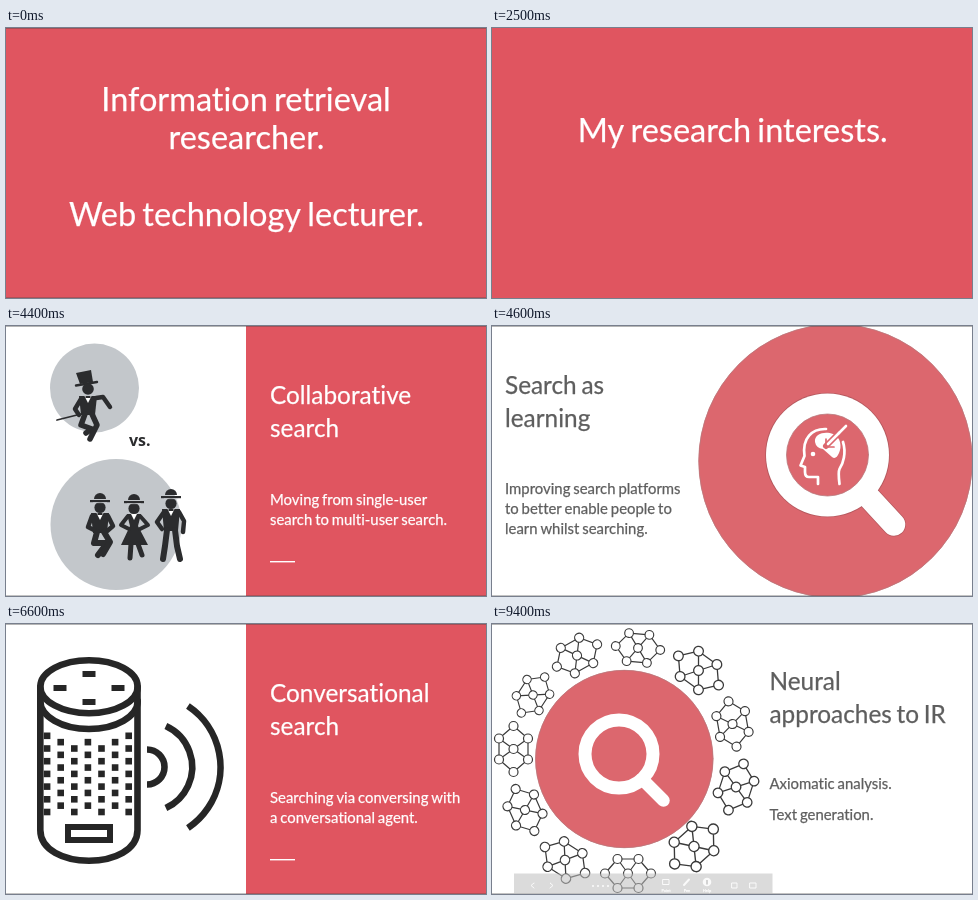
An HTML page with a canvas that plays this animation: 480 by 270 pixels, repeating every 9.5 s.

```html
<!DOCTYPE html>
<html lang="en">
<head>
<meta charset="utf-8">
<title>Research interests</title>
<style>
html, body { margin: 0; width: 100%; height: 100%; overflow: hidden; background: #fff; }
canvas { display: block; width: 480px; height: 270px; }
</style>
</head>
<body>
<canvas id="stage"></canvas>
<script>
const LOOP = 9500, W = 480, H = 270, TAU = Math.PI * 2;
const RED = '#e05560', ROSE = '#dc676e', GREY = '#5e5e5e', DARK = '#2b2c2e', MIST = '#c3c7cb';
const BIG = 32.5, TITLE = 24.35, BODY = 14.9;

const canvas = document.getElementById('stage');
const dpr = window.devicePixelRatio || 1;
canvas.width = W * dpr;
canvas.height = H * dpr;
const c = canvas.getContext('2d');
c.scale(dpr, dpr);
c.lineCap = c.lineJoin = 'round';

// The tiny letter spacing turns ligatures off; the hairline gives a fuller weight
function text(str, x, y, size, color, align = 'left') {
  c.font = `${size}px Lato, sans-serif`;
  c.letterSpacing = '0.01px';
  c.wordSpacing = `${-0.065 * size}px`;
  c.textAlign = align;
  c.fillStyle = c.strokeStyle = color;
  c.lineWidth = .25;
  c.fillText(str, x, y);
  c.strokeText(str, x, y);
}

function rect(x, y, w, h, color) {
  c.fillStyle = color;
  c.fillRect(x, y, w, h);
}

function disc(x, y, r, color) {
  c.fillStyle = color;
  c.beginPath();
  c.arc(x, y, r, 0, TAU);
  c.fill();
}

function ring(x, y, r, width, color) {
  c.strokeStyle = color;
  c.lineWidth = width;
  c.beginPath();
  c.arc(x, y, r, 0, TAU);
  c.stroke();
}

// Polyline through x, y pairs
function line(width, color, ...p) {
  c.strokeStyle = color;
  c.lineWidth = width;
  c.beginPath();
  for (let i = 0; i < p.length; i += 2) c.lineTo(p[i], p[i + 1]);
  c.stroke();
}

function poly(color, ...p) {
  c.fillStyle = color;
  c.beginPath();
  for (let i = 0; i < p.length; i += 2) c.lineTo(p[i], p[i + 1]);
  c.fill();
}

function path(d, width, color) {
  c.strokeStyle = color;
  c.lineWidth = width;
  c.stroke(new Path2D(d));
}

function edges() {
  rect(0, 0, W, 1, 'rgba(70,70,70,.4)');
  rect(0, H - 1, W, 1, 'rgba(70,70,70,.32)');
}

function about() {
  rect(0, 0, W, H, RED);
  text('Information retrieval', 240, 82.9, BIG, '#fff', 'center');
  text('researcher.', 240.5, 121.1, BIG, '#fff', 'center');
  text('Web technology lecturer.', 240.5, 197.9, BIG, '#fff', 'center');
  edges();
}

function interests() {
  rect(0, 0, W, H, RED);
  text('My research interests.', 240.7, 114.4, BIG, '#fff', 'center');
}

function redPanel(title, body) {
  rect(240, 0, 240, H, RED);
  title.forEach((s, i) => text(s, 264, 77.5 + 33 * i, TITLE, '#fff'));
  body.forEach((s, i) => text(s, 264, 178.6 + 20.2 * i, BODY, '#fff'));
  rect(264, 235, 25, 1.4, '#fff');
}

function bowler(x, y) {
  rect(x - 10, y + 6, 20, 2.2, DARK);
  c.beginPath();
  c.arc(x, y + 5, 6, Math.PI, 0);
  c.fill();
  disc(x, y + 13.5, 5.6, DARK);
  rect(x - 7, y + 8.3, 14, .8, MIST);
}

function suit(x, y, h) {
  poly(DARK, x - 9, y, x + 9, y, x + 7, y + h, x - 7, y + h);
  poly('#fff', x - 3.5, y, x + 3.5, y, x, y + 7);
  rect(x - 2.5, y, 5, 2, DARK);
}

function dancers() {
  disc(88.5, 62, 44.5, MIST);
  poly(DARK, 70, 47, 85, 44, 87, 56, 74, 58);
  line(2.4, DARK, 70, 59.5, 91, 56);
  disc(82, 63, 5.8, DARK);
  suit(82, 70, 19);
  line(4.5, DARK, 75, 73, 69, 83, 73, 89);
  line(1.8, DARK, 51, 94, 75, 88);
  line(4.5, DARK, 90, 72, 97, 71, 104, 81);
  line(5.5, DARK, 79, 88, 75, 99, 86, 103, 80, 107);
  line(5.5, DARK, 86, 88, 91, 99, 84, 113);

  c.font = '600 16px "Noto Sans", sans-serif';
  c.textAlign = 'left';
  c.fillStyle = DARK;
  c.fillText('vs.', 123, 119.5);

  disc(110, 198.5, 65.5, MIST);
  bowler(94, 168);
  suit(94, 187, 20);
  line(4.5, DARK, 86, 190, 82, 201, 90, 205);
  line(4.5, DARK, 102, 190, 107, 200, 100, 206);
  line(6, DARK, 91, 206, 88, 217, 101, 217, 92, 229);
  line(6, DARK, 98, 206, 104, 216, 97, 228);

  bowler(128, 169);
  poly(DARK, 121, 188, 135, 188, 132, 200, 142, 219, 115, 219, 124, 200);
  poly('#fff', 125, 188, 131, 188, 128, 194);
  line(4, DARK, 122, 190, 115, 199, 123, 203);
  line(4, DARK, 134, 190, 142, 199, 134, 203);
  line(5, DARK, 125, 218, 124, 232);
  line(5, DARK, 132, 218, 136, 229);

  bowler(165, 164);
  suit(165, 183, 22);
  line(4.5, DARK, 158, 186, 151, 196, 156, 203);
  line(4.5, DARK, 173, 186, 178, 195, 177, 206);
  line(6, DARK, 161, 204, 159, 220, 157, 233);
  line(6, DARK, 169, 204, 171, 220, 174, 233);
}

function collaborative() {
  rect(0, 0, W, H, '#fff');
  dancers();
  redPanel(['Collaborative', 'search'], ['Moving from single-user', 'search to multi-user search.']);
  edges();
}

function headIcon() {
  path('M326 158V151H317Q313 151 313 146V141L308.5 139.5L312.5 130C310 112 320 102.5 334 103', 2.7, '#fff');
  path('M351 116C354.5 127 351 138 347.5 143Q346 146 347.5 158', 2.7, '#fff');
  disc(321, 128, 2.3, '#fff');
  c.fillStyle = '#fff';
  c.fill(new Path2D('M323 116C322 107 334 105 341 108C349 111 350 121 347 127Q344 134 340 131L331 123Q324 122 323 116Z'));
  line(6, ROSE, 354, 100, 334, 120);
  line(2.6, '#fff', 354, 100, 347, 107);
  line(1.7, ROSE, 334, 113, 334, 121, 342, 121);
  line(2.6, '#fff', 347, 107, 336, 118);
}

function learning() {
  rect(0, 0, W, H, '#fff');
  disc(343.5, 135, 137, ROSE);
  ring(343.5, 135, 136.7, .8, '#b9797d');
  line(24, 'rgba(110,60,65,.35)', 372, 166, 402, 198.5);
  ring(335.5, 129, 51.3, 22, 'rgba(110,60,65,.35)');
  line(22.5, '#fff', 372, 166, 402, 198.5);
  disc(335.5, 129, 61.5, '#fff');
  disc(335.5, 129, 41, ROSE);
  ring(335.5, 129, 41, .8, '#b9797d');
  headIcon();
  text('Search as', 13, 67.5, TITLE, GREY);
  text('learning', 13, 100.5, TITLE, GREY);
  ['Improving search platforms', 'to better enable people to', 'learn whilst searching.']
    .forEach((s, i) => text(s, 13, 168 + 20.2 * i, BODY, GREY));
  edges();
}

function speaker() {
  const ink = '#262626', wide = 6.6;
  path('M34.3 63V206C34.3 226 58 236.7 83 236.7S131.500 226 131.500 206V63', wide, ink);
  c.beginPath();
  c.ellipse(83, 62.7, 48.7, 26.500, 0, 0, TAU);
  c.stroke();
  c.beginPath();
  c.ellipse(83, 77, 48.7, 28, 0, 0, Math.PI);
  c.stroke();
  for (const [x, y] of [[83, 50], [83, 78], [54, 64], [112, 64]]) rect(x - 6.5, y - 3, 13, 6, ink);

  // Every other column of holes sits half a step lower
  for (let col = 0; col < 7; col++) {
    const outer = col % 6 === 0, odd = col % 2;
    for (let row = outer || odd ? 0 : 1; row < 7 - odd; row++) {
      rect(37.8 + 13.6 * col, 108.5 + 12.7 * (row + odd / 2), 6.6, 6.6, ink);
    }
  }

  c.lineJoin = 'miter';
  c.lineCap = 'butt';
  c.strokeStyle = ink;
  c.lineWidth = 6;
  c.strokeRect(62, 203, 42, 13);
  c.lineWidth = wide;
  for (const [r, a] of [[17.5, Math.PI / 2], [45.2, 1.14], [73.5, .98]]) {
    c.beginPath();
    c.arc(141, 143, r, -a, a);
    c.stroke();
  }
  c.lineCap = c.lineJoin = 'round';
}

function conversational() {
  rect(0, 0, W, H, '#fff');
  speaker();
  redPanel(['Conversational', 'search'], ['Searching via conversing with', 'a conversational agent.']);
  edges();
}

// x, y, turn in degrees, scale
const clusters = [
  [136, 249.5, 0, 1], [73, 236, 33, 1.04], [33, 186, 66, 1], [21.5, 125, 90, 1],
  [41, 71, 123, .93], [85, 31.5, 151, 1], [146, 24, 185, .97], [206.5, 46.5, 216, 1.08],
  [240.5, 100, 260, 1], [244, 163, 288, 1.06], [202, 222.5, 318, 1.13]
];
const hex = [[-23, 0], [-10.5, -14.5], [10.5, -14.5], [23, 0], [10.5, 14.5], [-10.5, 14.5]];

function cluster([x, y, turn, size]) {
  const ink = '#3a3a3a';
  c.save();
  c.translate(x, y);
  c.rotate(turn * TAU / 360);
  c.scale(size, size);
  line(1.2, ink, ...hex.flat(), ...hex[0]);
  line(1.2, ink, ...hex[1], ...hex[4]);
  line(1.2, ink, ...hex[2], ...hex[5]);
  for (const [nx, ny] of [[0, 0], ...hex]) {
    disc(nx, ny, 4.5, '#fff');
    ring(nx, ny, 4.5, 1.2, ink);
  }
  c.restore();
}

function lens() {
  disc(132.3, 135, 89, ROSE);
  ring(132.3, 135, 88.7, .8, '#b9797d');
  line(12.5, '#fff', 150, 155, 171.5, 176.5);
  ring(127, 130, 34, 13, '#fff');
}

function toolbar() {
  rect(22, 249.5, 258.5, 20.5, 'rgba(190,190,190,.55)');
  const pale = 'rgba(255,255,255,.85)';
  line(1, pale, 42, 259, 39, 261.5, 42, 264);
  line(1, pale, 58, 259, 61, 261.5, 58, 264);
  for (let i = 0; i < 4; i++) disc(101 + 5 * i, 262, 1.1, pale);
  c.strokeStyle = pale;
  c.lineWidth = 1;
  c.strokeRect(171, 255.5, 6, 5);
  line(2, pale, 192, 261, 197, 255.5);
  disc(215, 258, 4.3, pale);
  rect(214.5, 256, 1, 4.5, '#aaa');
  text('Point', 174, 267.5, 4, pale, 'center');
  text('Pen', 195, 267.5, 4, pale, 'center');
  text('Help', 215, 267.5, 4, pale, 'center');
  c.lineWidth = 1;
  c.strokeRect(240, 259, 5, 5);
  c.strokeRect(258, 259, 6, 5);
}

function neural(t) {
  rect(0, 0, W, H, '#fff');
  if (t >= 8500) lens();
  clusters.forEach(cluster);
  text('Neural', 277.5, 66.3, TITLE, GREY);
  text('approaches to IR', 277.5, 99.3, TITLE, GREY);
  text('Axiomatic analysis.', 277.5, 164.8, BODY, GREY);
  text('Text generation.', 277.5, 195.8, BODY, GREY);
  edges();
  if (t >= 9400) toolbar();
}

function draw(t) {
  if (t < 1700) {
    about();
    if (t >= 1000) {
      c.globalAlpha = Math.min(1, (t - 900) / 800);
      interests();
      c.globalAlpha = 1;
    }
  } else if (t < 2700) interests();
  else if (t < 4600) collaborative();
  else if (t < 6600) learning();
  else if (t < 8000) conversational();
  else neural(t);
}

const start = performance.now();
function tick() {
  draw((performance.now() - start) % LOOP);
  requestAnimationFrame(tick);
}
tick();
</script>
</body>
</html>
```
